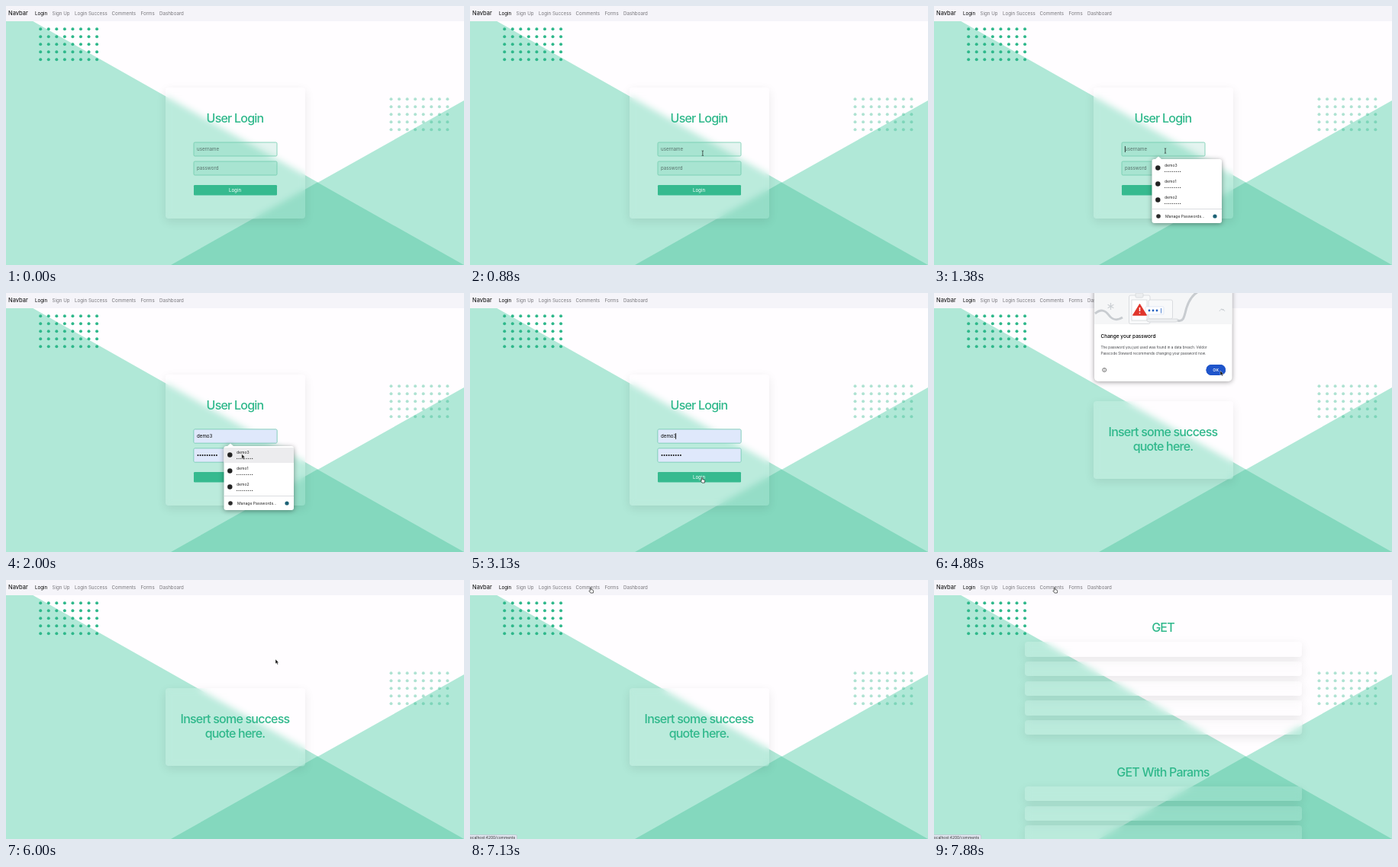
These frames come from a looping animation (600 by 340 pixels, 8 s). An HTML page:

```html
<!DOCTYPE html>
<html lang="en">
<meta charset="utf-8">
<title>Login demo</title>
<style>
html, body { margin: 0; width: 100%; height: 100%; overflow: hidden; background: #fffdff; }
svg, .card { position: absolute; left: 0; top: 0; }
svg { width: 600px; height: 340px; overflow: hidden; }
text { font: 6.2px Inter, "Open Sans", sans-serif; white-space: pre; }
.card {
  border-radius: 4px; background: rgba(255,255,255,.14);
  backdrop-filter: blur(4px); box-shadow: 0 4px 13px rgba(0,0,0,.085);
}
.title { font-size: 16px; font-weight: 500; letter-spacing: -.78px; fill: #2fb88b; text-anchor: middle; }
.mid { text-anchor: middle; }
.nav { fill: #77767b; }
.hint { fill: #56706a; }
.field { fill: #2fb88b; fill-opacity: .13; stroke: #6fcbac; stroke-width: .8; }
.filled { fill: #dfe8fb; stroke: #8fd0c4; stroke-width: .8; }
.small { font-size: 5.1px; fill: #222; }
.body { font-size: 4.65px; fill: #44464a; }
.line { fill: none; stroke: #d3d6da; stroke-width: .8; }
.shade { filter: drop-shadow(0 1px 3px rgba(0,0,0,.38)); }
</style>
<body>
<svg id="back">
  <path fill="#b0e8d7" d="M0 0L600 340H0zM216 340L600 124V340z"/>
  <path fill="#84d8be" d="M408 231.6L600 340H216z"/>
  <g id="dotsLeft" fill="#2fb88b"></g>
  <g id="dotsRight" fill="#2fb88b" opacity=".38"></g>
  <rect width="600" height="20" fill="#f5f4f9"/>
</svg>

<div id="cards"></div>

<svg>
  <text x="3" y="12" style="font-size:7.5px">Navbar</text>
  <text x="38" y="11.5">Login</text>
  <g class="nav">
    <text x="60.5" y="11.5">Sign Up</text>
    <text x="90" y="11.5">Login Success</text>
    <text x="138.5" y="11.5">Comments</text>
    <text x="176.5" y="11.5">Forms</text>
    <text x="201" y="11.5">Dashboard</text>
  </g>

  <g data-show="0 3400">
    <text class="title" x="300" y="153">User Login</text>
    <rect class="field" x="246" y="179" width="109" height="18" rx="1.5"/>
    <rect class="field" x="246" y="204" width="109" height="18" rx="1.5"/>
    <rect x="246" y="235" width="109" height="13.5" rx="1.2" fill="#36ba8f"/>
    <text class="mid" x="300" y="244" fill="#fff">Login</text>
    <g data-show="0 2000">
      <text class="hint" x="250" y="190">username</text>
      <text class="hint" x="250" y="215">password</text>
    </g>
    <path data-show="1000 2000" d="M250.4 184v8" stroke="#111" stroke-width=".8"/>
    <g data-show="2000 3400">
      <rect class="filled" x="246" y="179" width="109" height="18" rx="1.5"/>
      <rect class="filled" x="246" y="204" width="109" height="18" rx="1.5"/>
      <text x="250" y="190">demo3</text>
      <path class="secret" d="M251.5 213h26" stroke="#111" stroke-width="2" stroke-linecap="round" stroke-dasharray="0 3.05"/>
    </g>
    <path data-show="2250 3400" d="M269.6 184v8" stroke="#111" stroke-width=".8"/>
  </g>

  <g data-show="1130 2250">
    <path class="shade" fill="#fff" d="M288.500 201H290l4-3.500 4 3.500H374a3 3 0 0 1 3 3V282a3 3 0 0 1-3 3H288.500a3 3 0 0 1-3-3V204a3 3 0 0 1 3-3z"/>
    <rect data-show="2000 2250" x="285.500" y="203" width="91.500" height="20" fill="#ececee"/>
    <g id="accounts"></g>
    <path class="line" d="M285.500 266.500H377"/>
    <circle cx="294" cy="276" r="2.800" fill="#2b2b2b"/>
    <text class="small" x="303" y="277.800">Manage Passwords...</text>
    <circle cx="368" cy="276" r="2.600" fill="#1d6276"/>
  </g>

  <g data-show="3400 7500">
    <text class="title" x="300" y="187.500">Insert some success</text>
    <text class="title" x="300" y="207">quote here.</text>
  </g>

  <g id="dialog" data-show="3500 5560">
    <rect class="shade" x="210" y="-8" width="180.500" height="124" rx="5" fill="#fff"/>
    <path fill="#f5f6f7" d="M210 0h180.500v41H210z"/>
    <path d="M211 27c7-6 13-5 18 2s12 7 18 3M319 36c9 3 9-8 12-17s7-16 14-20" fill="none" stroke="#c8ccd0" stroke-width="3"/>
    <path d="M231.500 13v9M227.600 15.300l7.800 4.500M235.400 15.300l-7.800 4.500" stroke="#ccd0d4" stroke-width="1.200"/>
    <g class="line">
      <rect x="255.500" y="3" width="27.500" height="37.500" rx="2" fill="#f8f9fa"/>
      <rect x="259" y="9" width="20" height="27" fill="#fff"/>
      <rect x="264" y="0" width="10" height="6" rx="1.500" fill="#eceef0"/>
      <rect x="281" y="9" width="31.500" height="25" rx="2" fill="#f8f9fa"/>
      <path d="M279 34h40v2q0 2-3 2h-34q-3 0-3-2z" fill="#eceef0"/>
      <path d="M374 24a3 3 0 0 1 4-2 3 3 0 0 1 3 2M376 21l4 1" stroke="#c5c9cd"/>
    </g>
    <rect x="277" y="18" width="24" height="10" rx="1" fill="#fff" stroke="#d6e0f2" stroke-width=".7"/>
    <path d="M282 23h12" stroke="#2462c4" stroke-width="2.800" stroke-linecap="round" stroke-dasharray="0 5"/>
    <path d="M297.500 20v6.500" stroke="#2462c4" stroke-width=".8"/>
    <path d="M269.500 14.500l9 14.700h-18z" fill="#e0352b" stroke="#e0352b" stroke-linejoin="round"/>
    <path d="M269.500 19v5M269.500 25.700v1.500" stroke="#fff" stroke-width="1.500"/>
    <text x="218.500" y="59.300" style="font-size:6.500px;font-weight:500">Change your password</text>
    <text class="body" x="218.500" y="73.300">The password you just used was found in a data breach. Veldor</text>
    <text class="body" x="218.500" y="81.300">Passcode Steward recommends changing your password now.</text>
    <circle cx="223.200" cy="101" r="2.500" fill="none" stroke="#444" stroke-width=".7"/>
    <path d="M223.200 100.600v1.800M223.200 99.200v.8" stroke="#444" stroke-width=".7"/>
    <rect x="356.500" y="94" width="25.500" height="14" rx="7" fill="#0b43bd"/>
    <rect data-show="4750 5560" x="356.500" y="94" width="25.500" height="14" rx="7" fill="#1f55cb"/>
    <text class="mid" x="369.200" y="103" fill="#fff" style="font-size:5.400px;font-weight:500">OK</text>
  </g>

  <g data-show="7500 8000">
    <text class="title" x="300" y="68">GET</text>
    <text class="title" x="300" y="258">GET With Params</text>
  </g>
  <g data-show="6800 8000">
    <path d="M-1 334.500H60q1.500 0 1.500 1.500v5H-1z" fill="#dfe4ee" stroke="#b9c0cc" stroke-width=".6"/>
    <text x="-1.500" y="340" style="font-size:4.900px" fill="#333">localhost:4200/comments</text>
  </g>

  <g id="cursor" stroke-linejoin="round">
    <path id="arrow" d="M0 0v6l1.400-1.200 1 2.200 1.100-.5-1-2.100h1.800z" fill="#111" stroke="#fff" stroke-width=".4"/>
    <path id="beam" d="M-1.200-3.200q1.200 0 1.200.8v5q0 .8-1.200.8M1.200-3.200q-1.200 0-1.200.8M1.200 3.400q-1.200 0-1.200-.8" fill="none" stroke="#222" stroke-width=".7"/>
    <path id="hand" d="M-.7 3.800V.6a.7.7 0 0 1 1.400 0v2l2.300.6q.8.300.7 1.200l-.4 2.600H0L-2 4.500q.4-1 1.300-.1z" fill="#fff" stroke="#222" stroke-width=".7"/>
  </g>
</svg>

<script>
const LOOP = 8000;
const $ = id => document.getElementById(id);
const range = n => [...Array(n).keys()];
const clamp = v => Math.max(0, Math.min(1, v));

function dots(id, left, top) {
  $(id).innerHTML = range(40).map(i =>
    `<circle cx="${left + i % 8 * 10.55}" cy="${top + (i >> 3) * 10}" r="2"/>`).join('');
}
dots('dotsLeft', 45.2, 30.2);
dots('dotsRight', 504.5, 122.2);

function card(x, y, w, h, show) {
  $('cards').insertAdjacentHTML('beforeend',
    `<div class="card" data-show="${show}" style="left:${x}px;top:${y}px;width:${w}px;height:${h}px"></div>`);
}
card(209, 106.5, 182.5, 172.5, '0 3400');
card(209, 141.5, 182.5, 102.5, '3400 7500');
range(5).forEach(i => card(118.5, 81.3 + i * 25.7, 363.5, 19.3, '7500 8000'));
range(3).forEach(i => card(118.5, 271 + i * 25.7, 363.5, 19.3, '7500 8000'));

$('accounts').innerHTML = ['demo3', 'demo1', 'demo2'].map((name, i) =>
  `<g transform="translate(0 ${i * 21})"><circle cx="293.3" cy="212.5" r="3.2" fill="#222"/>
   <text class="small" x="302" y="210.500" font-weight="500">${name}</text>
   <path d="M302.700 217.300h21" stroke="#222" stroke-width="1.300" stroke-linecap="round" stroke-dasharray="0 2.500"/></g>`).join('');

// Pointer stops: time, x, y
const stops = [
  [400, 345, 262], [950, 303, 190], [1550, 303, 190], [2050, 309, 212], [2300, 309, 212],
  [2850, 304, 242], [4130, 304, 243], [4850, 375, 102], [5500, 375, 102],
  [5900, 353, 104], [6100, 353, 104], [6850, 158, 10], [LOOP, 158, 10]
];

function pointerAt(t) {
  const i = Math.max(1, stops.findIndex(s => s[0] > t));
  const [t0, x0, y0] = stops[i - 1], [t1, x1, y1] = stops[i];
  const p = clamp((t - t0) / (t1 - t0)), k = p * p * (3 - 2 * p);
  return [x0 + (x1 - x0) * k, y0 + (y1 - y0) * k];
}

function pointerShape(t, x, y) {
  const overField = t < 2000 && x < 355 && y > 179 && y < 197;
  const overLogin = t > 2300 && t < 3400 && y > 235;
  const overLink = t > 6000 && y < 15;
  return overField ? 'beam' : overLogin || overLink ? 'hand' : 'arrow';
}

const timed = [...document.querySelectorAll('[data-show]')].map(el =>
  [el, ...el.dataset.show.split(' ').map(Number)]);

function draw(now) {
  const t = now % LOOP;
  for (const [el, from, to] of timed) el.style.display = t >= from && t < to ? '' : 'none';

  const shown = clamp((t - 3500) / 180) * clamp((5560 - t) / 130);
  $('dialog').setAttribute('opacity', shown);
  $('dialog').setAttribute('transform', `translate(0 ${-12 * (1 - shown)})`);

  const [x, y] = pointerAt(t), shape = pointerShape(t, x, y);
  $('cursor').style.display = t < 400 ? 'none' : '';
  $('cursor').setAttribute('transform', `translate(${x} ${y})`);
  for (const id of ['arrow', 'beam', 'hand']) $(id).style.display = id === shape ? '' : 'none';
  requestAnimationFrame(draw);
}
requestAnimationFrame(draw);
</script>
</body>
</html>
```
